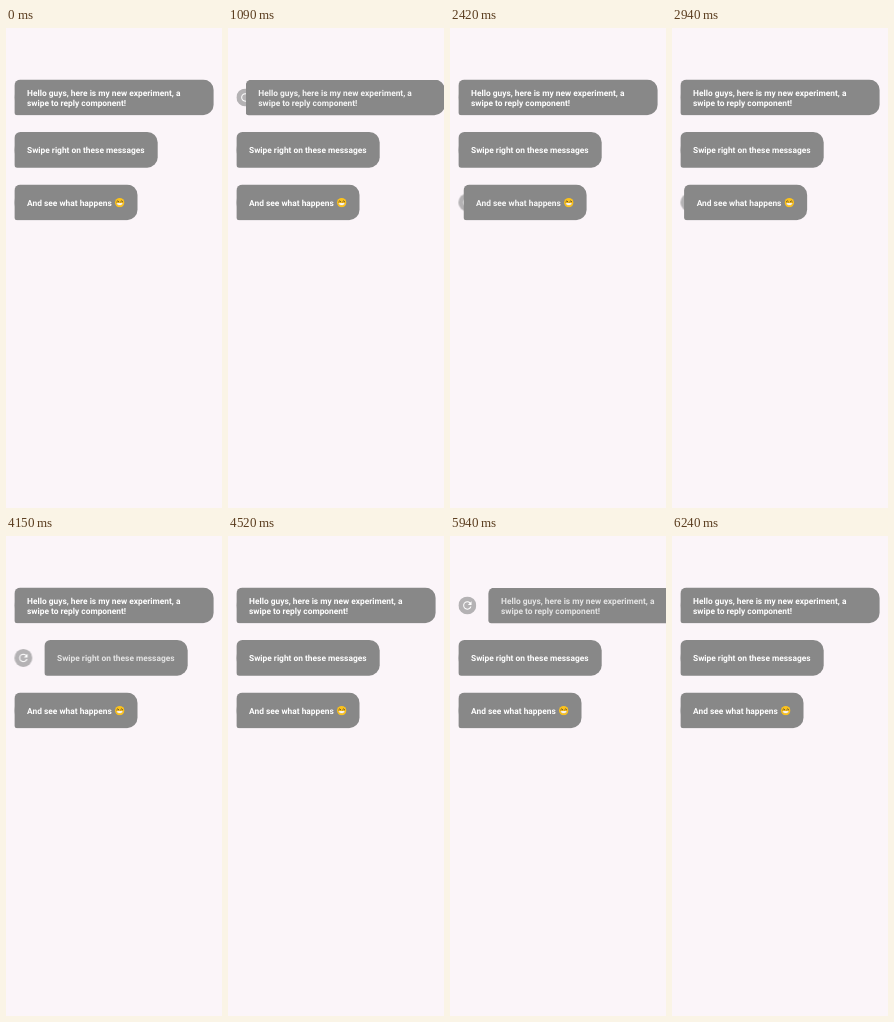
Animation, 216 px wide and 480 px high, one loop 6.48 s. Source, as an HTML page:

```html
<!DOCTYPE html>
<html lang="en">
<head>
<meta charset="utf-8">
<title>Swipe to reply</title>
<style>
  html, body { margin: 0; width: 100%; height: 100%; overflow: hidden; background: #fbf5f9; }
  .stage { display: block; }
  .bubble {
    fill: #fff;
    font: 700 8.4px Roboto, sans-serif;
    text-rendering: geometricPrecision;
    animation: 6480ms linear infinite;
  }
  .box { fill: #888; }
  .first { animation-name: swipe-first; }
  .second { animation-name: swipe-second; }
  .third { animation-name: swipe-third; }

  /* Drag to the stop, hold, then glide back over 300 ms */
  @keyframes swipe-first {
    0%, 16.34% { transform: translateX(0); fill: #fff; }
    16.358% { transform: translateX(5px); fill: #f8f8f8; }
    19.136% { transform: translateX(30px); fill: #e4e4e4; }
    21.142% { transform: translateX(30px); fill: #e4e4e4; animation-timing-function: cubic-bezier(.4, 0, .2, 1); }
    25.772%, 87.48% { transform: translateX(0); fill: #fff; }
    87.5% { transform: translateX(5px); fill: #f8f8f8; }
    90.432% { transform: translateX(30px); fill: #e4e4e4; }
    91.667% { transform: translateX(30px); fill: #e4e4e4; animation-timing-function: cubic-bezier(.4, 0, .2, 1); }
    96.296%, 100% { transform: translateX(0); fill: #fff; }
  }
  @keyframes swipe-second {
    0%, 59.86% { transform: translateX(0); fill: #fff; }
    59.877% { transform: translateX(5px); fill: #f8f8f8; }
    63.426% { transform: translateX(30px); fill: #e4e4e4; }
    65.123% { transform: translateX(30px); fill: #e4e4e4; animation-timing-function: cubic-bezier(.4, 0, .2, 1); }
    69.753%, 100% { transform: translateX(0); fill: #fff; }
  }
  @keyframes swipe-third {
    0%, 37.33% { transform: translateX(0); fill: #fff; }
    37.346% { transform: translateX(5px); fill: #f8f8f8; }
    41.358% { transform: translateX(30px); fill: #e4e4e4; }
    42.593% { transform: translateX(30px); fill: #e4e4e4; animation-timing-function: cubic-bezier(.4, 0, .2, 1); }
    47.222%, 100% { transform: translateX(0); fill: #fff; }
  }
</style>
</head>
<body>
<svg class="stage" width="216" height="480" viewBox="0 0 216 480">
  <defs>
    <symbol id="reply" viewBox="0 0 34 34" width="17.9" height="17.9">
      <circle cx="17" cy="17" r="17" fill="#b4b2b4"/>
      <path transform="translate(5 5)" fill="#fff" d="M17.65 6.35A8 8 0 1 0 19.73 14h-2.08A6 6 0 1 1 12 6c1.66 0 3.14.69 4.22 1.78L13 11h7V4z"/>
    </symbol>
    <symbol id="grin" viewBox="0 0 20 20" width="9.8" height="9.8">
      <circle cx="10" cy="10" r="9.6" fill="#fcc21b"/>
      <path d="M3.8 8.2q2.2-4 4.4 0M11.8 8.2q2.2-4 4.4 0" fill="none" stroke="#45372f" stroke-width="1.6" stroke-linecap="round"/>
      <path d="M3.6 10.6h12.8q-.5 5-6.4 5t-6.4-5z" fill="#fff" stroke="#a5793a" stroke-width=".5"/>
    </symbol>
  </defs>

  <g transform="translate(8.4 51.5)">
    <use href="#reply" y="9"/>
    <g class="bubble first">
      <path class="box" d="M6 0H188.7a10.5 10.5 0 0 1 10.5 10.5V25.2a10.5 10.5 0 0 1-10.5 10.5H3a3 3 0 0 1-3-3V6a6 6 0 0 1 6-6z"/>
      <text x="12.6" y="16.1">Hello guys, here is my new experiment, a</text>
      <text x="12.6" y="26">swipe to reply component!</text>
    </g>
  </g>

  <g transform="translate(8.4 104)">
    <use href="#reply" y="9"/>
    <g class="bubble second">
      <path class="box" d="M6 0H132.8a10.5 10.5 0 0 1 10.5 10.5V25.2a10.5 10.5 0 0 1-10.5 10.5H3a3 3 0 0 1-3-3V6a6 6 0 0 1 6-6z"/>
      <text x="12.6" y="21">Swipe right on these messages</text>
    </g>
  </g>

  <g transform="translate(8.4 156.5)">
    <use href="#reply" y="9"/>
    <g class="bubble third">
      <path class="box" d="M6 0H112.6a10.5 10.5 0 0 1 10.5 10.5V25.2a10.5 10.5 0 0 1-10.5 10.5H3a3 3 0 0 1-3-3V6a6 6 0 0 1 6-6z"/>
      <text x="12.6" y="21">And see what happens</text>
      <use href="#grin" x="100.4" y="13.2"/>
    </g>
  </g>
</svg>
</body>
</html>
```
